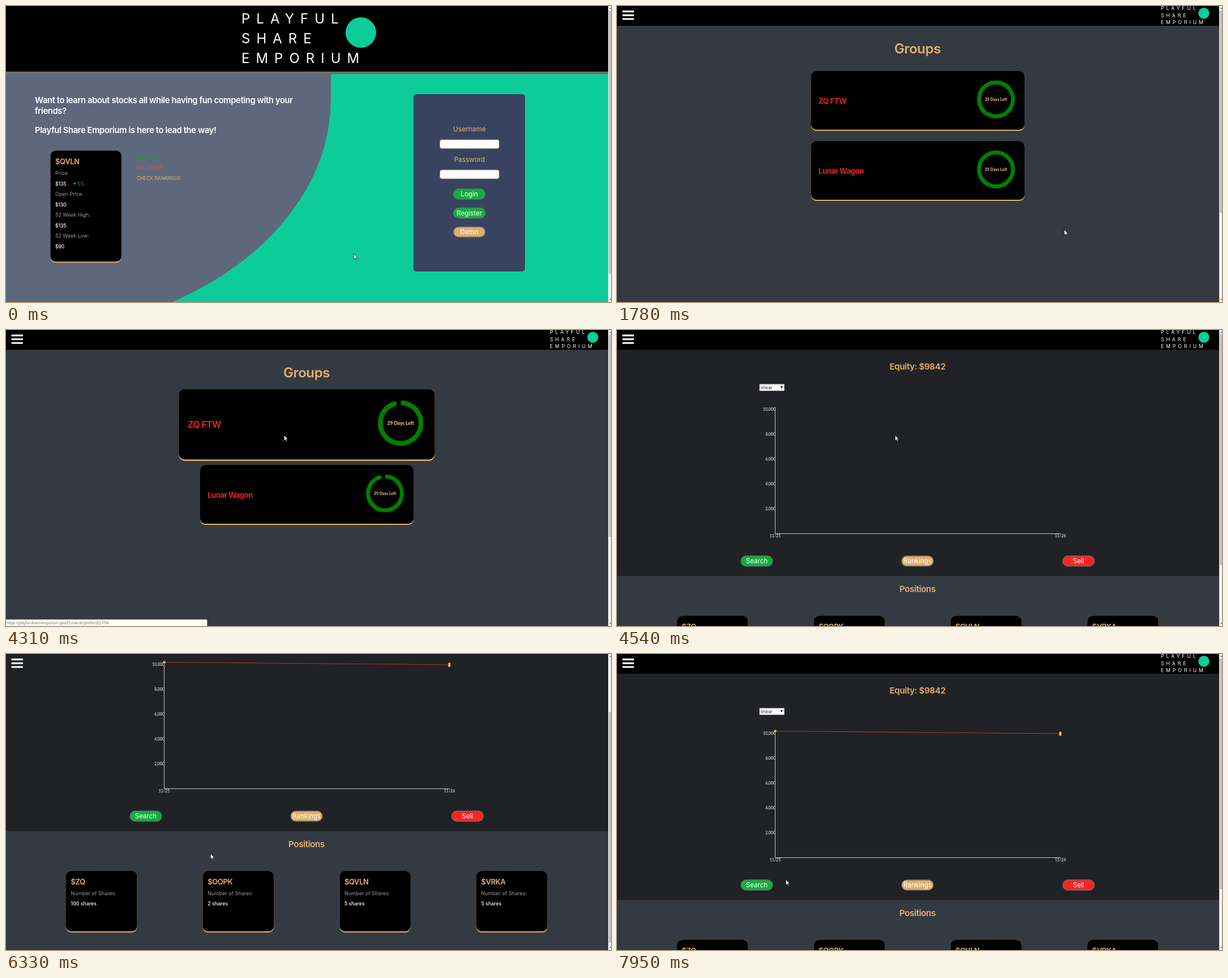
Animation, 1069 px wide and 524 px high, one loop 8 s. Source, as an HTML page:

```html
<!DOCTYPE html>
<html lang="en">
<head>
<meta charset="utf-8">
<title>Share game</title>
<style>
  html, body { margin: 0; height: 100%; overflow: hidden; background: #000; }
  svg { display: block; width: 1069px; height: 524px; font-family: Inter, "Open Sans", sans-serif; }
  text { white-space: pre; }
  .mid { text-anchor: middle; }
  .end { text-anchor: end; }
  .bold { font-weight: 600; letter-spacing: -.4px; }
  .med { font-weight: 500; }
  .black { font-weight: 900; }
  .logo { letter-spacing: 11px; }
  .lato { font-family: Lato, sans-serif; }
  .url { font-family: "Noto Sans", sans-serif; }
</style>
</head>
<body>
<svg id="stage" viewBox="0 0 1069 524"></svg>
<script>
const ORANGE = '#e3b06c', GREEN = '#0fb03c', RED = '#ff2424', GREY = '#9b9b9b',
      SLATE = '#343a42', MINT = '#0ccd99', WHITE = '#fff';
const LOOP = 8000, SCROLL = 122;

const text = (x, y, str, size, fill, cls = '') =>
  `<text x="${x}" y="${y}" font-size="${size}" fill="${fill}" class="${cls}">${str}</text>`;
const rect = (x, y, w, h, fill, r = 0, extra = '') =>
  `<rect x="${x}" y="${y}" width="${w}" height="${h}" rx="${r}" fill="${fill}" ${extra}/>`;
const group = (id, body, extra = '') => `<g id="${id}" ${extra}>${body}</g>`;
const card = (x, y, w, h) => rect(x, y, w, h, ORANGE, 9) + rect(x, y, w, h - 2, '#000', 9);
const button = (cx, cy, label, fill) =>
  rect(cx - 28, cy - 9, 56, 18, fill, 9, 'stroke="#6d6d6d" stroke-width="1.3"') +
  text(cx, cy + 4.2, label, 11.6, WHITE, 'mid');
const input = y => rect(766.5, y, 105, 16, WHITE, 4, 'stroke="#777"');

const logo = ['PLAYFUL', 'SHARE', 'EMPORIUM']
  .map((word, i) => text(416, 30.5 + 35 * i, word, 24, WHITE, 'logo')).join('') +
  `<circle cx="627" cy="47" r="27" fill="${MINT}"/>`;
const smallLogo = `<g transform="translate(811.2 -4) scale(.36)">${logo}</g>`;
const topBar = rect(0, 0, 1064, 35, '#000') + smallLogo;
const menu = [8, 14.7, 21.4].map(y => rect(9.5, y, 20.5, 3.2, WHITE, .8)).join('');

const quote = [
  ['Price:', GREY], ['$135', WHITE], ['Open Price:', GREY], ['$130', WHITE],
  ['52 Week High:', GREY], ['$135', WHITE], ['52 Week Low:', GREY], ['$90', WHITE],
].map(([s, c], i) => text(87, 299 + 18.57 * i, s, c === WHITE ? 8.5 : 9, c, c === WHITE ? 'med' : '')).join('');

const login = group('login',
  rect(0, 0, 1064, 524, MINT) +
  `<path d="M0 120H574V165A574 418 0 0 1 0 583Z" fill="#5d687c"/>` +
  rect(0, 0, 1064, 116, '#000') + rect(0, 116, 1064, 4.5, '#6c6c6c') + logo +
  text(51, 171.5, 'Want to learn about stocks all while having fun competing with your', 14.8, WHITE, 'bold') +
  text(51, 191, 'friends?', 14.8, WHITE, 'bold') +
  text(51, 224.5, 'Playful Share Emporium is here to lead the way!', 14.8, WHITE, 'bold') +
  card(78.5, 256, 125.5, 198.5) + text(87, 279.5, '$QVLN', 13, ORANGE, 'bold') + quote +
  `<path d="M118.5 315.5l3-3.5 3 3.5z" fill="${GREEN}"/>` + text(126, 317.6, '5%', 8.5, GREEN) +
  text(231, 270.5, 'BUY LOW!', 8.4, '#12a63a') +
  text(231, 289, 'SELL HIGH!', 8.4, '#ea5138') +
  text(231, 307.5, 'CHECK RANKINGS!', 8.4, ORANGE) +
  rect(720, 156, 197, 314, '#38445f', 5) +
  text(819, 222, 'Username', 11.9, ORANGE, 'mid') + input(236.5) +
  text(819, 275.5, 'Password', 11.8, ORANGE, 'mid') + input(290) +
  button(818.7, 333, 'Login', GREEN) + button(818.7, 366.5, 'Register', GREEN) +
  button(818.7, 400, 'Demo', '#dfae69') +
  rect(790.5, 390.5, 57, 19, 'none', 0, 'id="focus" stroke="#3f78cf"'));

const groupCard = (id, y, name) => group(id,
  card(343, y, 377, 106) +
  text(356, y + 57.5, name, 13.2, RED, 'bold') +
  `<circle class="ring" cx="669.7" cy="${y + 50.3}" r="30" fill="none" stroke="#008000" stroke-width="7"
    stroke-linecap="round" pathLength="360" transform="rotate(-83.5 669.7 ${y + 50.3})"/>` +
  text(669.7, y + 52.8, '29 Days Left', 7, ORANGE, 'mid lato black'));

const groups = group('groups',
  rect(0, 0, 1064, 524, SLATE) + topBar + text(531, 84, 'Groups', 24, ORANGE, 'mid bold') +
  group('cards', groupCard('lower', 239, 'Lunar Wagon') + groupCard('upper', 115, 'ZQ FTW')) +
  group('status', rect(-3, 512.5, 358.5, 15, WHITE, 2) +
    text(1, 521, 'https://playful-share-emporium.qvol25.now.sh/profile/ZQ FTW', 6.2, '#6b6b6b', 'url')));

const dot = (x, y) => `<circle cx="${x}" cy="${y}" r="2.3" fill="${ORANGE}"/>`;
const chart =
  [10, 8, 6, 4, 2].map((n, i) => text(280, 142.5 + 44.1 * i, n + ',000', 7, WHITE, 'end lato')).join('') +
  `<path d="M279.5 136.5V360.5H784" fill="none" stroke="#c9c9c9"/>` +
  text(279.5, 367, '11/25', 7, WHITE, 'mid lato') + text(783.5, 367, '11/26', 7, WHITE, 'mid lato') +
  group('plot', `<path d="M279.5 136.5L783.3 141" stroke="#a8362f"/>` +
    dot(279.5, 136.5) + dot(783.3, 139.5) + dot(783.3, 142.7));

const positions = [['$ZQ', 100], ['$OOPK', 2], ['$QVLN', 5], ['$VRKA', 5]].map(([name, count], i) => {
  const x = 106 + 241.7 * i;
  return card(x, 506, 125.5, 109) + text(x + 8.5, 529.5, name, 13, ORANGE, 'bold') +
    text(x + 8.5, 549, 'Number of Shares:', 9.1, GREY) +
    text(x + 8.5, 567.3, count + ' shares', 8.8, WHITE, 'med');
}).join('');

const profile = group('profile', rect(0, 0, 1064, 524, SLATE) +
  group('page', rect(0, 35, 1064, 400.5, '#212225') + topBar +
    group('content',
      text(531, 69.7, 'Equity: $9842', 15.2, ORANGE, 'mid bold') +
      rect(252, 96, 43.5, 11.5, WHITE, 0, 'stroke="#aaa"') + text(254, 104.6, 'linear', 8, '#333') +
      `<path d="M288.7 99.6h4.4l-2.2 4z"/>` + chart +
      button(247, 409, 'Search', GREEN) + button(531, 409, 'Rankings', '#dfae69') +
      button(815.5, 409, 'Sell', RED) +
      text(531, 463.5, 'Positions', 15.2, ORANGE, 'mid bold') + positions)));

const scrollbar = rect(1064, 0, 5, 524, '#f1f1f1') + rect(1065, 8, 4, 400, '#c1c1c1', 0, 'id="thumb"') +
  `<path d="M1066.3 5l1.7-2 1.7 2zM1066.3 518.5l1.7 2 1.7-2z" fill="#505050"/>`;
const pointer = group('pointer',
  `<path id="arrow" d="M.5 .3V10L2.7 8 4.2 11.4 5.6 10.8 4.1 7.5H7Z"/>
   <path id="hand" d="M-.9 .8Q0-.6 .9 .8V4.6L5.2 5.8Q6.2 6.2 6 7.4L5 12.6H-.2L-3.3 8.4Q-3 7-1.6 7.6L-.9 8.3Z"/>`,
  'fill="#fff" stroke="#000" stroke-width=".6" stroke-linejoin="round"');

document.getElementById('stage').innerHTML =
  login + groups + profile + group('menu', menu) + scrollbar + pointer;

const el = id => document.getElementById(id);
const show = (id, on) => { el(id).style.display = on ? '' : 'none'; };
const place = (id, value) => el(id).setAttribute('transform', value);
const ramp = (t, from, to) => {
  const p = Math.min(1, Math.max(0, (t - from) / (to - from)));
  return p * p * (3 - 2 * p);
};

// Pointer path: time, x, y
const path = [
  [0, 614, 438.5], [380, 614, 438.5], [1150, 820, 405], [1380, 816, 401], [1600, 816, 401],
  [2090, 745, 386], [2250, 745, 386], [2780, 473, 307], [3080, 486, 208], [3400, 489, 190],
  [3850, 491, 186], [5010, 491, 186], [5200, 502, 194], [5630, 345, 281.5], [5860, 338, 346],
  [6330, 361, 353], [6790, 361, 353], [7420, 353, 343], [7560, 353, 343], [7950, 298, 399], [LOOP, 298, 399],
];
function pointerAt(t) {
  const i = path.findIndex(k => k[0] > t), [t0, x0, y0] = path[i - 1], [t1, x1, y1] = path[i];
  const p = (t - t0) / (t1 - t0);
  return `translate(${x0 + (x1 - x0) * p} ${y0 + (y1 - y0) * p})`;
}

function zoom(id, cy, amount, thin) {
  place(id, `translate(531.5 ${cy}) scale(${1 + .2 * amount}) translate(-531.5 ${-cy})`);
  el(id).querySelector('.bold').style.fontWeight = thin ? 400 : 600;
}

function draw() {
  const t = performance.now() % LOOP;
  const onLogin = t < 1630, onProfile = t >= 4400;

  show('login', onLogin);
  show('focus', t >= 1380);
  show('groups', !onLogin && !onProfile);
  show('cards', t >= 1700);
  show('status', t >= 3200);
  show('profile', onProfile);
  show('content', t >= 4540);
  show('plot', t >= 4700);
  show('menu', !onLogin);

  zoom('lower', 291.75, ramp(t, 2775, 3000) - ramp(t, 2860, 3085), t > 2770 && t < 3085);
  zoom('upper', 167.75, ramp(t, 2900, 3200), t > 2900 && t < 3200);
  const gap = 24.5 * ramp(t, 2850, 3500);
  for (const ring of document.querySelectorAll('.ring'))
    ring.setAttribute('stroke-dasharray', gap ? `${360 - gap} 360` : 'none');

  const scrolled = ramp(t, 5900, 6280) - ramp(t, 6760, 7240);
  place('page', `translate(0 ${-SCROLL * scrolled})`);
  el('thumb').setAttribute('y', 8 + 95 * scrolled);
  el('thumb').setAttribute('height', onLogin ? 466 : onProfile ? 408 : 358);

  const overCard = t >= 2770 && t < 4160;
  show('arrow', !overCard);
  show('hand', overCard);
  place('pointer', pointerAt(t));
  requestAnimationFrame(draw);
}
draw();
</script>
</body>
</html>
```
